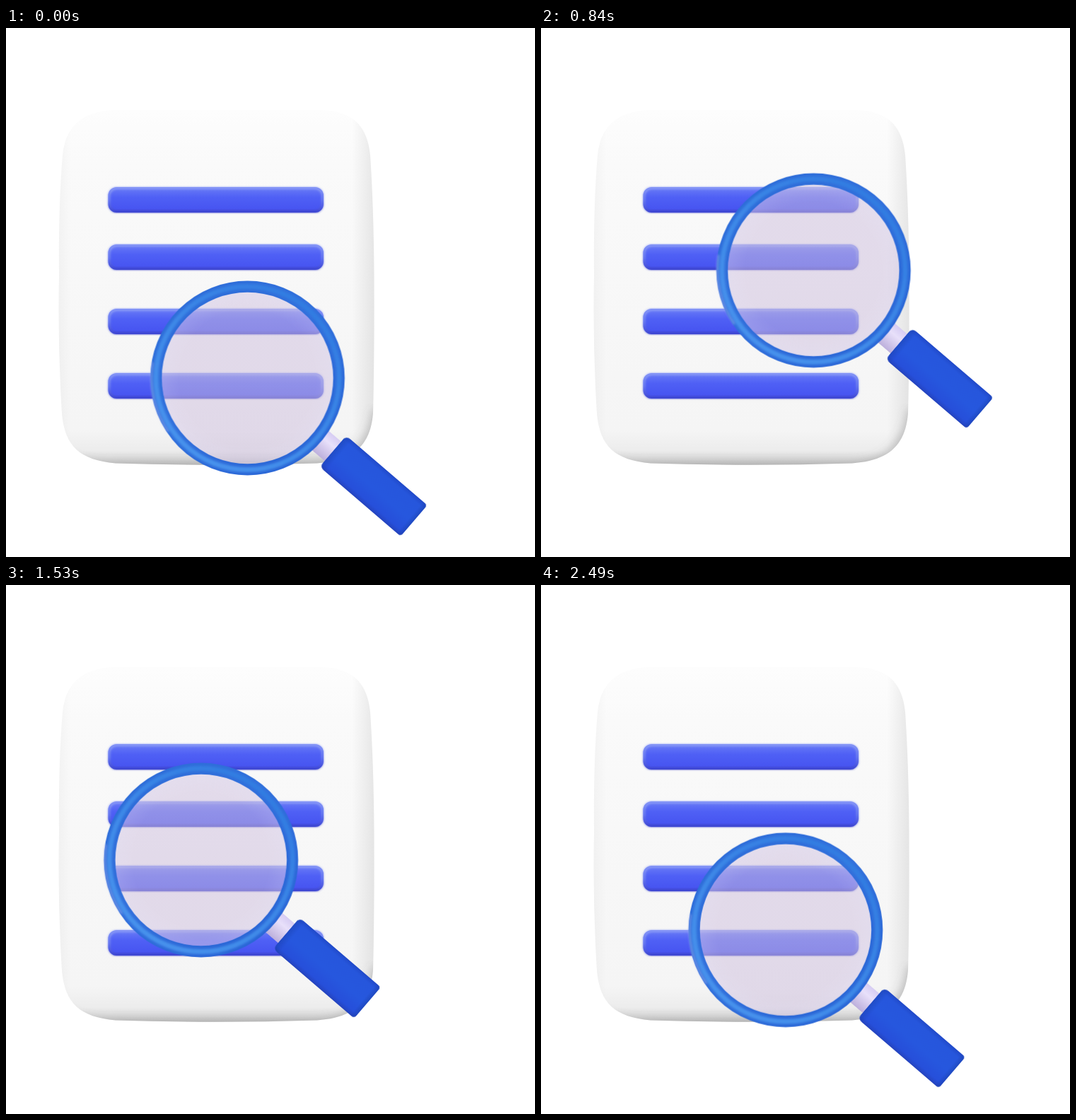
Animation of 748 by 748 pixels, one loop 2.52 s. Source, as an HTML page:

```html
<!DOCTYPE html>
<html lang="en">
<head>
<meta charset="utf-8">
<title>Document search</title>
<style>
  html, body { margin: 0; width: 100%; height: 100%; overflow: hidden; background: #fff; }
  svg { display: block; width: 100vw; height: 100vh; }
</style>
</head>
<body>
<svg viewBox="0 0 748 748">
  <defs>
    <path id="sheet" d="M150 116H448C490 118 511 138 515 180Q520 255 520.5 350Q521 470 519 545C515 592 490 612 440 615.5Q295 620 155 615.5C105 611 83 592 79 545Q73 450 75 350Q74 250 80 180C84 140 106 119 150 116Z"/>
    <clipPath id="inSheet"><use href="#sheet"/></clipPath>
    <linearGradient id="face" x2="0" y2="1">
      <stop offset="0" stop-color="#fdfdfd"/>
      <stop offset=".15" stop-color="#fafafa"/>
      <stop offset=".9" stop-color="#f5f5f5"/>
      <stop offset=".96" stop-color="#ececec"/>
      <stop offset="1" stop-color="#cacaca"/>
    </linearGradient>
    <linearGradient id="side">
      <stop offset="0" stop-color="#888" stop-opacity=".06"/>
      <stop offset=".04" stop-color="#888" stop-opacity="0"/>
      <stop offset=".93" stop-color="#777" stop-opacity="0"/>
      <stop offset="1" stop-color="#777" stop-opacity=".15"/>
    </linearGradient>
    <linearGradient id="bar" x2="0" y2="1">
      <stop offset="0" stop-color="#6a7cf6"/>
      <stop offset=".4" stop-color="#4f60f5"/>
      <stop offset=".85" stop-color="#4755f1"/>
      <stop offset="1" stop-color="#3f49dc"/>
    </linearGradient>
    <linearGradient id="edge" x2="0" y2="1">
      <stop offset="0" stop-color="#8f9ff6"/>
      <stop offset=".5" stop-color="#7284ee"/>
      <stop offset="1" stop-color="#3d45cc"/>
    </linearGradient>
    <radialGradient id="glass">
      <stop offset=".8" stop-color="#d1c2e0" stop-opacity=".49"/>
      <stop offset="1" stop-color="#d6cbe8" stop-opacity=".54"/>
    </radialGradient>
    <linearGradient id="rim" x2=".8" y2="1">
      <stop offset="0" stop-color="#2d6cd8"/>
      <stop offset=".5" stop-color="#3270dc"/>
      <stop offset="1" stop-color="#2a66d6"/>
    </linearGradient>
    <linearGradient id="shine" x1=".9" y1="0" x2=".1" y2="1">
      <stop offset="0" stop-color="#2f7ae0"/>
      <stop offset="1" stop-color="#4a95ee"/>
    </linearGradient>
    <linearGradient id="neck" x2="0" y2="1">
      <stop offset="0" stop-color="#d6ccf3"/>
      <stop offset=".35" stop-color="#e8e0fa"/>
      <stop offset="1" stop-color="#bdb0dc"/>
    </linearGradient>
    <linearGradient id="grip" x2="0" y2="1">
      <stop offset="0" stop-color="#2049c8"/>
      <stop offset=".12" stop-color="#2656dc"/>
      <stop offset=".55" stop-color="#2657de"/>
      <stop offset=".88" stop-color="#264fda"/>
      <stop offset="1" stop-color="#2443bd"/>
    </linearGradient>
    <linearGradient id="gripEnds">
      <stop offset="0" stop-color="#163a9e" stop-opacity=".4"/>
      <stop offset=".07" stop-color="#163a9e" stop-opacity="0"/>
      <stop offset=".95" stop-color="#163a9e" stop-opacity="0"/>
      <stop offset="1" stop-color="#163a9e" stop-opacity=".45"/>
    </linearGradient>
    <path id="handle" d="M167 -29H305Q310 -29 310 -24V24Q310 29 305 29H167Q159 29 159 21V-21Q159 -29 167 -29Z"/>
    <filter id="soft" x="-10%" y="-10%" width="120%" height="120%"><feGaussianBlur stdDeviation="1.6"/></filter>
    <filter id="smooth" x="-5%" y="-5%" width="110%" height="110%"><feGaussianBlur stdDeviation=".7"/></filter>
    <filter id="blur" x="-10%" y="-10%" width="120%" height="120%"><feGaussianBlur stdDeviation="7"/></filter>
  </defs>

  <use href="#sheet" fill="url(#face)"/>
  <use href="#sheet" fill="url(#side)"/>
  <g clip-path="url(#inSheet)">
    <path d="M60 590Q90 626 160 622H440Q515 618 526 540" fill="none" stroke="#707070" stroke-opacity=".42" stroke-width="12" filter="url(#blur)"/>
  </g>
  <g id="bars" filter="url(#smooth)"></g>

  <g clip-path="url(#inSheet)"><circle class="lens" r="122" fill="#9a86a8" fill-opacity=".05"/></g>
  <g class="lens">
    <circle r="122" fill="url(#glass)"/>
    <g transform="rotate(40.6)">
      <rect x="130" y="-18" width="36" height="36" fill="url(#neck)"/>
      <use href="#handle" fill="url(#grip)"/>
      <use href="#handle" fill="url(#gripEnds)"/>
    </g>
    <circle r="129.3" fill="none" stroke="url(#rim)" stroke-width="16.2"/>
    <circle r="129.6" fill="none" stroke="url(#shine)" stroke-width="7" filter="url(#soft)"/>
    <path d="M-134.5 -22A136 136 0 0 0 -112 76" fill="none" stroke="#a9b4f0" stroke-opacity=".55" stroke-width="2.5" filter="url(#soft)"/>
  </g>
</svg>
<script>
  const LOOP = 2520;
  const bars = document.getElementById('bars');
  const lenses = document.querySelectorAll('.lens');

  bars.innerHTML = [225, 306, 397, 488].map(y => `
    <rect x="144.5" y="${y}" width="304.5" height="36" rx="12" fill="url(#bar)"/>
    <rect x="146" y="${y + 1.5}" width="301.5" height="33" rx="10.5" fill="none"
      stroke="url(#edge)" stroke-width="3" filter="url(#soft)"/>`).join('');

  const linear = p => p;
  const easeOut = p => 1 - (1 - p) ** 1.64;
  const easeInOut = p => (1 - Math.cos(Math.PI * p)) / 2;

  // Each move: start time, end time, easing, path points
  const moves = [
    [38, 1065, easeOut, [[341.5, 495], [429.5, 450], [378, 325]]],
    [1080, 1560, easeInOut, [[378, 325], [274.8, 389.5]]],
    [2070, 2490, linear, [[274.8, 389.5], [346, 487.5]]],
    [2490, LOOP, linear, [[346, 487.5], [341.5, 495]]]
  ];

  function along(points, p) {
    const lengths = points.slice(1).map(([x, y], i) => Math.hypot(x - points[i][0], y - points[i][1]));
    let d = p * lengths.reduce((a, b) => a + b);
    let i = 0;
    while (i < lengths.length - 1 && d > lengths[i]) d -= lengths[i++];
    const k = d / lengths[i];
    return [0, 1].map(a => points[i][a] + (points[i + 1][a] - points[i][a]) * k);
  }

  function lensAt(t) {
    const [start, end, ease, points] = moves.findLast(m => t >= m[0]) || moves[0];
    const p = Math.min(1, Math.max(0, (t - start) / (end - start)));
    return along(points, ease(p));
  }

  const origin = performance.now();
  function draw() {
    const [x, y] = lensAt((performance.now() - origin) % LOOP);
    lenses.forEach(el => el.setAttribute('transform', `translate(${x} ${y})`));
    requestAnimationFrame(draw);
  }
  draw();
</script>
</body>
</html>
```
